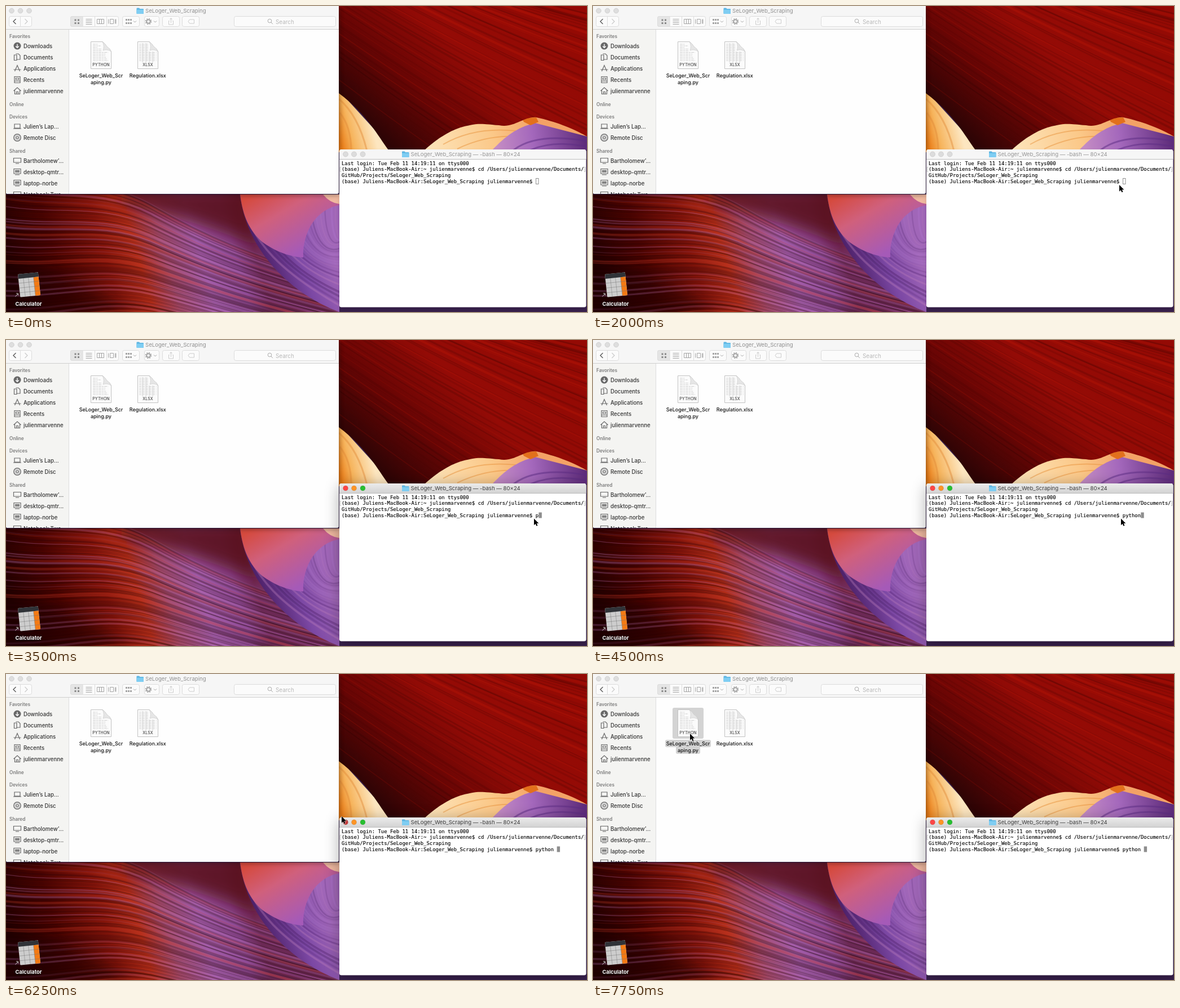
An HTML page for the animation above (8000 ms loop, 1030 by 544 pixels).

```html
<!DOCTYPE html>
<html lang="en">
<head>
<meta charset="utf-8">
<title>Desktop</title>
<style>
html, body { margin: 0; width: 100%; height: 100%; overflow: hidden; background: #2a0404; }
svg { display: block; width: 1030px; height: 544px; font-family: Inter, "Open Sans", sans-serif; }
.mono { font: 8.93px "DejaVu Sans Mono", monospace; white-space: pre; fill: #000; stroke: #000; stroke-width: .12; }
.side { font-size: 9.65px; font-weight: 500; fill: #333; }
.head { font-size: 8.3px; font-weight: 600; fill: #7c7c7c; }
.file { font-size: 8.95px; font-weight: 500; fill: #111; text-anchor: middle; }
.kind { font-size: 7px; font-weight: 500; fill: #444; text-anchor: middle; letter-spacing: .1px; }
.title { font-size: 9.6px; }
.btn { fill: #fbfbfb; stroke: #dcdcdc; }
.ico { fill: none; stroke: #686868; stroke-width: 1.2; }
.dim { fill: none; stroke: #ccc; }
</style>
</head>
<body>
<svg viewBox="0 0 1030 544">
  <defs>
    <linearGradient id="rock" gradientUnits="userSpaceOnUse" x1="930" y1="10" x2="690" y2="255">
      <stop offset="0" stop-color="#940a04"/><stop offset=".4" stop-color="#940b06"/>
      <stop offset=".7" stop-color="#680504"/><stop offset="1" stop-color="#2e0405"/>
    </linearGradient>
    <linearGradient id="sand" gradientUnits="userSpaceOnUse" x1="590" y1="230" x2="650" y2="215">
      <stop offset="0" stop-color="#ea7d18"/><stop offset=".35" stop-color="#f6b45c"/><stop offset="1" stop-color="#fde6c0"/>
    </linearGradient>
    <linearGradient id="dune" gradientUnits="userSpaceOnUse" x1="750" y1="250" x2="940" y2="215">
      <stop offset="0" stop-color="#fde3b8"/><stop offset=".6" stop-color="#fbc888"/><stop offset="1" stop-color="#f3a266"/>
    </linearGradient>
    <linearGradient id="lilac" gradientUnits="userSpaceOnUse" x1="870" y1="250" x2="1030" y2="235">
      <stop offset="0" stop-color="#c48cc4"/><stop offset=".4" stop-color="#a468bc"/><stop offset="1" stop-color="#5c2a78"/>
    </linearGradient>
    <linearGradient id="slope" gradientUnits="userSpaceOnUse" x1="20" y1="520" x2="430" y2="400">
      <stop offset="0" stop-color="#220000"/><stop offset=".2" stop-color="#4a0300"/>
      <stop offset=".4" stop-color="#84140a"/><stop offset=".53" stop-color="#b02c18"/>
      <stop offset=".64" stop-color="#a44a6a"/><stop offset=".78" stop-color="#a05aa6"/>
      <stop offset=".92" stop-color="#8c4892"/><stop offset="1" stop-color="#752f60"/>
    </linearGradient>
    <linearGradient id="coral" gradientUnits="userSpaceOnUse" x1="440" y1="335" x2="505" y2="447">
      <stop offset="0" stop-color="#d54a3e"/><stop offset=".4" stop-color="#d0607c"/><stop offset="1" stop-color="#a55ab8"/>
    </linearGradient>
    <linearGradient id="violet" gradientUnits="userSpaceOnUse" x1="455" y1="455" x2="565" y2="410">
      <stop offset="0" stop-color="#4c2068"/><stop offset=".5" stop-color="#7c48a4"/><stop offset="1" stop-color="#a066b8"/>
    </linearGradient>
    <linearGradient id="bar" x2="0" y2="1">
      <stop offset="0" stop-color="#ebebeb"/><stop offset="1" stop-color="#d3d3d3"/>
    </linearGradient>
    <filter id="soft" x="-20%" y="-20%" width="140%" height="140%"><feGaussianBlur stdDeviation="4"/></filter>
    <filter id="wide" x="-30%" y="-30%" width="160%" height="160%"><feGaussianBlur stdDeviation="14"/></filter>
    <clipPath id="rockClip"><path id="rockShape" d="M590,0H1030V232C1012,222 985,208 940,198C918,196 900,218 874,212C850,210 838,208 822,212C790,217 762,238 742,256H678C660,232 640,192 590,155Z"/></clipPath>
    <clipPath id="slopeClip"><path d="M0,335H415C420,390 470,490 590,544H0Z"/></clipPath>
    <clipPath id="violetClip"><path d="M415,335H591V544C500,510 425,430 415,335Z"/></clipPath>
    <clipPath id="finderClip"><path d="M0,0H590V331Q590,334 587,334H3Q0,334 0,331Z"/></clipPath>
    <g id="folder"><path d="M0,1.2Q0,0 1,0H4.5L6,1.4H11.5Q12.5,1.4 12.5,2.4V9.4Q12.5,10.4 11.5,10.4H1Q0,10.4 0,9.4Z" fill="#5bb4e2"/><path d="M0,3H12.5V9.4Q12.5,10.4 11.5,10.4H1Q0,10.4 0,9.4Z" fill="#7fcdf2"/></g>
    <g id="page"><path d="M.5,.5H21Q26,4 29,10Q35,13 36.5,18V48.5H.5Z" fill="#fbfbfb" stroke="#c2c2c2"/><path d="M21,.5Q25,8 22,16Q30,13 36.5,18Q35,13 29,9Q26,4 21,.5Z" fill="#e6e6e6" stroke="#c8c8c8" stroke-width=".6"/></g>
  </defs>

  <g id="wall">
    <rect width="1030" height="544" fill="#38204c"/>
    <path d="M590,150L690,260H590Z" fill="url(#sand)"/>
    <path d="M590,165Q625,195 640,258M592,190Q612,215 612,258" fill="none" stroke="#e08a38" stroke-width="3" opacity=".45"/>
    <rect x="735" y="190" width="295" height="66" fill="url(#dune)"/>
    <path d="M775,246Q830,214 905,222M800,254Q850,230 900,232" fill="none" stroke="#e8923c" stroke-width="2" opacity=".5"/>
    <path d="M862,256C885,232 905,216 938,208L1030,232V256Z" fill="url(#lilac)"/>
    <path d="M900,256Q940,225 1030,240M930,256Q970,238 1030,250" fill="none" stroke="#5c2c84" stroke-width="3" opacity=".5"/>
    <path d="M914,199L940,198L944,206L930,212L918,206Z" fill="#e2701c"/>
    <use href="#rockShape" fill="url(#rock)"/>
    <g id="rockLines" clip-path="url(#rockClip)" fill="none"></g>
    <path d="M0,335H590V544H0Z" fill="url(#slope)"/>
    <g clip-path="url(#slopeClip)">
      <path d="M205,320H440L450,430Q350,385 205,352Z" fill="#560a12" opacity=".85" filter="url(#wide)"/>
      <path d="M-20,455Q110,465 240,560H-20Z" fill="#1c0000" opacity=".5" filter="url(#wide)"/>
      <g id="slopeLines" fill="none"></g>
    </g>
    <path d="M415,335H591V544C500,510 425,430 415,335Z" fill="url(#violet)"/>
    <g id="violetLines" clip-path="url(#violetClip)" fill="none"></g>
    <path d="M415,335C420,375 432,400 455,420C480,438 505,446 527,447C526,420 535,390 555,372Q570,358 591,354V335Z" fill="url(#coral)"/>
    <path d="M562,335H591V352Q574,350 562,335Z" fill="#f0b9a0"/>
  </g>

  <g transform="rotate(-6 41 495)">
    <rect x="23" y="475" width="36" height="41" rx="1.5" fill="#cdcdcd"/>
    <path d="M23,483V477Q23,475 25,475H57Q59,475 59,477V483Z" fill="#303338"/>
    <rect x="50" y="483" width="9" height="33" fill="#f47a14"/>
    <path d="M32,483V516M41,483V516M50,483V516M23,491H59M23,499.500H59M23,508H59" stroke="#777" stroke-width=".5"/>
  </g>
  <path d="M16.500,516.500L21,512M18,511H21.500V514.500" fill="none" stroke="#ccc"/>
  <text x="40" y="533" text-anchor="middle" font-size="9.4" font-weight="700" fill="#fff" style="text-shadow:0 1px 2px #000">Calculator</text>

  <rect x="-4" y="6" width="595" height="330" rx="4" filter="url(#soft)" opacity=".4"/>
  <g id="finder" clip-path="url(#finderClip)">
    <rect width="590" height="335" fill="#fefefe"/>
    <rect width="590" height="41" fill="#f6f6f6"/>
    <rect y="42" width="111" height="293" fill="#f4f4f2"/>
    <path d="M111.5,42V335" stroke="#dedede"/>
    <path d="M0,41.5H590" stroke="#cfcfcf"/>
    <g fill="#dedede" stroke="#c9c9c9" stroke-width=".8"><circle cx="10" cy="8.5" r="4.3"/><circle cx="25.5" cy="8.5" r="4.3"/><circle cx="41" cy="8.5" r="4.3"/></g>
    <use href="#folder" x="231.5" y="3.5"/>
    <text class="title" x="247" y="12.3" fill="#8f8f8f">SeLoger_Web_Scraping</text>
    <g class="btn">
      <rect x="5.5" y="18.5" width="40" height="18" rx="3"/><rect x="114.5" y="18.5" width="85" height="18" rx="3"/>
      <rect x="206.5" y="18.5" width="30" height="18" rx="3"/><rect x="245.5" y="18.5" width="26" height="18" rx="3"/>
      <rect x="277.5" y="18.5" width="30" height="18" rx="3"/><rect x="312.5" y="18.5" width="30" height="18" rx="3"/>
      <rect x="404.5" y="18.5" width="180" height="18" rx="3"/>
      <path d="M25.5,19V36M157.5,19V36M178.5,19V36"/>
      <path d="M117.5,18.5H136V36.5H117.5Q114.5,36.5 114.5,33.5V21.5Q114.5,18.5 117.5,18.5Z" style="fill:#e5e5e5"/>
    </g>
    <path d="M17.5,23L13,27.5L17.5,32" fill="none" stroke="#555" stroke-width="1.3"/>
    <path d="M33.5,23L38,27.5L33.5,32" class="dim" stroke-width="1.3"/>
    <path d="M121.5,23.5h3v3h-3zM127,23.5h3v3h-3zM121.5,29h3v3h-3zM127,29h3v3h-3z" fill="#888"/>
    <g fill="none" stroke="#a4a4a4">
      <path d="M141.5,23.5h11M141.5,26.5h11M141.5,29.5h11M141.5,32.5h11"/>
      <path d="M161.5,23.5h12v8h-12zM165.5,23.5v8M169.5,23.5v8"/>
      <path d="M184.5,23.5h6v8h-6zM181.5,23.5v8M193.5,23.5v8M195,23.5v8"/>
      <path d="M226,26.5l2.5,2.5l2.5,-2.5M262,26.5l2.5,2.5l2.5,-2.5"/>
      <circle cx="252.5" cy="27.5" r="3.3" stroke-width="2"/>
      <circle cx="252.5" cy="27.5" r="5" stroke-width="1.6" stroke-dasharray="2 1.93"/>
    </g>
    <path d="M212,23h3v3h-3zM216,23h3v3h-3zM220,23h3v3h-3zM212,29h3v3h-3zM216,29h3v3h-3zM220,29h3v3h-3z" fill="#a4a4a4"/>
    <path class="dim" d="M290,26.5h-1.5v6.5h8v-6.5h-1.5M292.5,30v-8M290,24l2.5,-2.5l2.5,2.5M323,27.5l2.5,-3.5h8v7h-8z"/>
    <g fill="none" stroke="#aaa"><circle cx="467.5" cy="26.5" r="3.3"/><path d="M470,29l3,3.2"/></g>
    <text x="478" y="31.5" font-size="9.9" fill="#b8b8b8">Search</text>
    <g id="sidebar"></g>

    <g id="picked" fill="#d3d3d3">
      <rect x="141" y="60" width="55" height="55" rx="3"/>
      <rect x="128" y="117" width="81" height="13" rx="3"/><rect x="147" y="129" width="43" height="13" rx="3"/>
    </g>
    <use href="#page" x="150" y="63"/><use href="#page" x="233" y="63"/>
    <g id="print" fill="none" stroke="#bdbdbd" stroke-width=".7"></g>
    <text class="kind" x="168.5" y="107.3">PYTHON</text>
    <text class="kind" x="251.5" y="107.3">XLSX</text>
    <text class="file" x="168.5" y="126.6">SeLoger_Web_Scr</text>
    <text class="file" x="168.5" y="138.6">aping.py</text>
    <text class="file" x="251.3" y="127.3">Regulation.xlsx</text>
  </g>

  <rect id="shade" x="592" y="260" width="436" height="277" rx="4" filter="url(#soft)"/>
  <g id="terminal">
    <path d="M591,273V259Q591,255 595,255H1024.5Q1028.5,255 1028.5,259V532Q1028.5,535.5 1025,535.5H594.5Q591,535.5 591,532Z" fill="#fff"/>
    <path id="termBar" d="M591,272V259Q591,255 595,255H1024.5Q1028.5,255 1028.5,259V272Z"/>
    <path d="M591,272.5H1028.5" stroke="#bcbcbc"/>
    <g id="lights"></g>
    <use href="#folder" x="702" y="258.5"/>
    <text class="title" id="termTitle" x="717.5" y="267.3">SeLoger_Web_Scraping — -bash — 80×24</text>
    <path d="M594,286.5h-1.5v8h1.5M1025,286.5h1.5v8h-1.5" fill="none" stroke="#a5a5a5" stroke-width=".8"/>
    <g id="lines"></g>
    <rect id="caret" y="306.5" height="10"/>
  </g>
  <path id="arrow" d="M0,0V11.8L2.7,9.2L4.5,13.2L6.5,12.3L4.7,8.4H8.4Z" fill="#000" stroke="#fff" paint-order="stroke"/>
</svg>
<script>
const $ = id => document.getElementById(id);
const add = (id, markup) => { $(id).innerHTML += markup; };

let seed = 7;
const rnd = () => (seed = (seed * 16807) % 2147483647) / 2147483647;

// Soft rock strata: one curve rule per region, swept by u from 0 to 1.
function strata(id, count, colors, curve) {
  let out = "";
  for (let i = 0; i < count; i++) {
    const u = (i + rnd()) / count;
    const color = colors[Math.floor(rnd() * colors.length)];
    out += `<path d="${curve(u)}" stroke="${color}" stroke-width="${(0.8 + rnd() * 3.5).toFixed(1)}" opacity="${(0.1 + rnd() * 0.25).toFixed(2)}"/>`;
  }
  add(id, out);
}
strata("rockLines", 44, ["#2a0202", "#4a0402", "#4a0402", "#c01a08"], u =>
  `M${350 + 550 * u},${-60 + 40 * u}Q${600 + 530 * u},${150 - 110 * u} ${870 + 490 * u},${330 - 250 * u}`);
strata("slopeLines", 70, ["#1c0000", "#2c0208", "#c83c28", "#b870b8"], u =>
  `M-10,${300 + 260 * u}C90,${322 + 240 * u} 170,${300 + 230 * u} 260,${352 + 195 * u}S430,${440 + 150 * u} 600,${490 + 130 * u}`);
strata("violetLines", 22, ["#35134f", "#4a1a66", "#b078cc", "#c080bc"], u =>
  `M${410 + 190 * u},330C${420 + 170 * u},${420 - 20 * u} ${490 + 110 * u},${480 - 30 * u} 610,${550 - 190 * u}`);

// Sidebar
const icons = {
  down: `<circle r="6.5" fill="#686868"/><path d="M0,-3.5V3M-2.8,.4L0,3.2L2.8,.4" fill="none" stroke="#fff" stroke-width="1.4"/>`,
  docs: `<path class="ico" d="M-5.5,-4H-1V5.5H-5.5ZM-2.5,-6H2L5,-3V4H-1"/>`,
  apps: `<path class="ico" d="M-4.5,5L0,-5.5L4.5,5M-6.5,2H6.5"/>`,
  recent: `<path class="ico" d="M-5,-5.5H5V5.5H-5ZM-5,2.5H5M-2.5,-3H2.5V0H-2.5Z"/>`,
  home: `<path class="ico" d="M-6.5,0L0,-6L6.5,0M-4.5,-1V5.5H4.5V-1M-1.5,5.5V1.5H1.5V5.5"/>`,
  laptop: `<path class="ico" d="M-5,-4H5V3H-5ZM-7,4H7"/>`,
  disc: `<circle class="ico" r="6.3" style="fill:#d2d2d2"/><circle class="ico" r="2" style="fill:#f4f4f2"/>`,
  screen: `<path class="ico" d="M-6.5,-4.5H6.5V3H-6.5ZM-3,5H3"/>`,
  tower: `<path class="ico" d="M-6,-5.5H6V3H-6ZM-4,5H4"/><path d="M-4,-3.5H4V1H-4Z" fill="#858585"/>`
};
const heads = [["Favorites", 54], ["Online", 175], ["Devices", 197], ["Shared", 258]];
const places = [
  ["Downloads", 71, "down"], ["Documents", 91, "docs"], ["Applications", 111, "apps"],
  ["Recents", 131, "recent"], ["julienmarvenne", 151, "home"], ["Julien’s Lap...", 214, "laptop"],
  ["Remote Disc", 234, "disc"], ["Bartholomew’...", 275, "screen"], ["desktop-qmtr...", 295, "tower"],
  ["laptop-norbe", 315, "tower"], ["Notebook Two", 335, "screen"]
];
add("sidebar", heads.map(([s, y]) => `<text class="head" x="6" y="${y + 3}">${s}</text>`).join("") +
  places.map(([s, y, icon]) => `<g transform="translate(20 ${y})">${icons[icon]}</g><text class="side" x="31" y="${y + 3.5}">${s}</text>`).join(""));

// Small print on the document icons
let print = "";
for (let i = 0; i < 11; i++) {
  const y = 68 + i * 2.9, end = i < 5 ? 170 : 183;
  print += `<path d="M154,${y}H${end - rnd() * 8}" stroke-dasharray="5 1 3 1"/><path d="M236,${y}H${i < 5 ? 254 : 267}" stroke-dasharray="4 2"/>`;
}
add("print", print + `<path d="M242,66V100M248,66V100M254,81V100M260,81V100"/>`);

// Terminal
const user = "julienmarvenne", host = "(base) Juliens-MacBook-Air:";
const prompt = `${host}SeLoger_Web_Scraping ${user}$ `;
const rows = [
  "Last login: Tue Feb 11 14:19:11 on ttys000",
  `${host}~ ${user}$ cd /Users/${user}/Documents/`,
  "GitHub/Projects/SeLoger_Web_Scraping",
  prompt
];
const LEFT = 595, CHAR = 5.376;
add("lines", rows.map((s, i) => `<text class="mono" xml:space="preserve" x="${LEFT}" y="${282.6 + i * 10.67}">${s}</text>`).join(""));
add("lights", [602, 617, 632.5].map(x => `<circle cx="${x}" cy="263.5" r="4.5" stroke-width=".7"/>`).join(""));
const lights = [...$("lights").children], input = $("lines").lastChild;
const lit = ["#fc4646", "#fd9426", "#27bf30"];

// Pointer and typing steps: [time, value...]
const moves = [
  [500, 723.5, 41], [750, 779.5, 219], [1250, 803, 288], [1500, 857.5, 313], [1750, 924.5, 320],
  [2000, 933, 318], [2500, 936, 317.5], [5500, 926.5, 317.5], [5750, 782, 289.5], [6250, 595, 253],
  [6500, 469.5, 191.5], [6750, 319.5, 161], [7000, 293.5, 156.5], [7250, 193, 119.5], [7500, 172, 106]
];
const typing = [[3500, 1], [3750, 2], [4000, 4], [4250, 5], [4500, 6], [4750, 7]];
const latest = (steps, t) => steps.filter(s => s[0] <= t).pop();

function draw(t) {
  const active = t >= 2250;
  const typed = (latest(typing, t) || [0, 0])[1];
  const at = latest(moves, t);
  const hover = t >= 6250 && t < 6500;

  $("arrow").setAttribute("visibility", at ? "visible" : "hidden");
  if (at) $("arrow").setAttribute("transform", `translate(${at[1]} ${at[2]})`);

  $("termBar").setAttribute("fill", active ? "url(#bar)" : "#f6f6f6");
  $("termTitle").setAttribute("fill", active ? "#3c3c3c" : "#959595");
  $("shade").setAttribute("filter", active ? "url(#wide)" : "url(#soft)");
  $("shade").setAttribute("opacity", active ? 0.35 : 0.15);
  lights.forEach((dot, i) => {
    dot.setAttribute("fill", !active ? "#dcdcdc" : hover && i === 0 ? "#c63b3b" : lit[i]);
    dot.setAttribute("stroke", active ? "rgba(0,0,0,.15)" : "#c8c8c8");
  });

  input.textContent = prompt + "python ".slice(0, typed);
  const caret = $("caret");
  caret.setAttribute("x", LEFT + (prompt.length + typed) * CHAR + (active ? 0 : 0.5));
  caret.setAttribute("width", active ? 5.4 : 4.4);
  caret.setAttribute("fill", active ? "#8e8e8e" : "none");
  caret.setAttribute("stroke", active ? "none" : "#8e8e8e");
  $("picked").setAttribute("visibility", t >= 7750 ? "visible" : "hidden");
}

const start = performance.now();
function tick() {
  draw((performance.now() - start) % 8000);
  requestAnimationFrame(tick);
}
tick();
</script>
</body>
</html>
```
